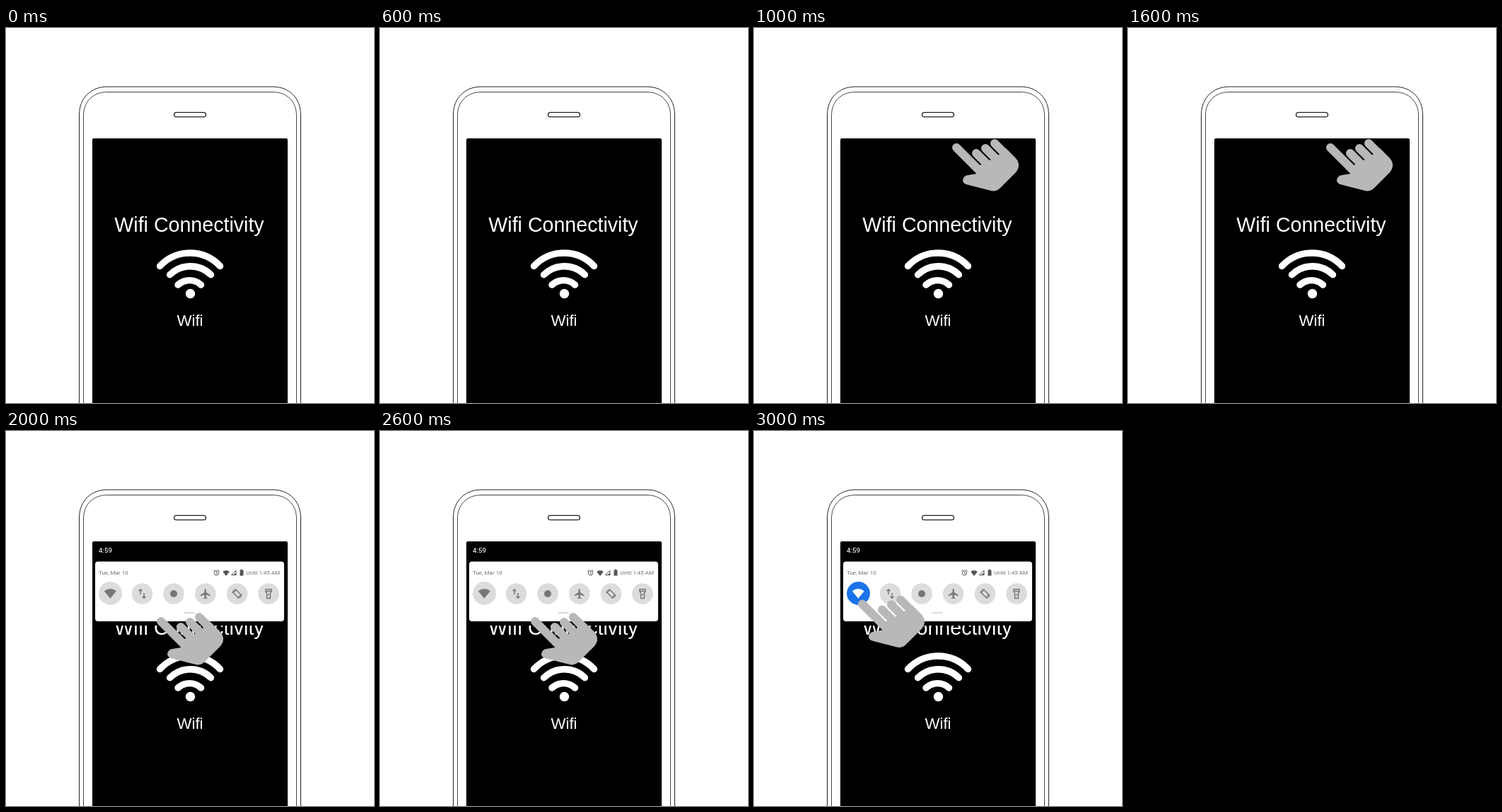
These frames come from a looping animation (520 px wide and 530 px high, 4000 ms). An HTML page:

```html
<!DOCTYPE html>
<html lang="en">
<head>
<meta charset="utf-8">
<title>Wifi Connectivity</title>
<style>
  html, body { margin: 0; width: 100%; height: 100%; overflow: hidden; background: #fff; }
  svg { display: block; width: 520px; height: 530px; }
  .title { font-family: "Liberation Sans", Arial, sans-serif; fill: #fff; text-anchor: middle; font-variant-ligatures: none; }
  .small { font: 8px Roboto, sans-serif; fill: #707070; }
  .clock { font: 500 9.6px Roboto, sans-serif; fill: #e4e4e4; }
  .line { fill: none; stroke: #777; stroke-width: 1.5; }
</style>
</head>
<body>
<svg viewBox="0 0 520 530">
  <defs>
    <path id="fan" d="M-8.5 -3.8Q0 -10 8.5 -3.8L0 6.8Z"/>
    <g id="handShape" fill="#b8b8b8">
      <path d="M286 169L322 205M314 177L332 195M327 170L345 188M340 163L361 184" stroke="#b8b8b8" stroke-width="12" stroke-linecap="round"/>
      <path d="M314 206L319 194L333 187L346 179L356 170L370 184Q378 194 370 204L349 225Q343 232 335 230L300 221Q295 219 295 215Q296 209 302 208Z"/>
    </g>
  </defs>

  <g fill="none" stroke="#222">
    <path d="M103.5 531V123C103.5 99 120 83 143 83H377C400 83 416.5 99 416.5 123V531"/>
    <path d="M109.5 531V124C109.5 104 123 90.5 143 90.5H377C397 90.5 410.5 104 410.5 124V531" stroke="#444"/>
    <rect x="237.5" y="119.3" width="45" height="6.4" rx="3.2" stroke-width="1.3"/>
  </g>
  <rect x="122" y="156" width="276" height="380" rx="2"/>

  <text class="title" x="259" y="288" font-size="28.6">Wifi Connectivity</text>
  <text class="title" x="260" y="421" font-size="22.3">Wifi</text>
  <g fill="none" stroke="#fff" stroke-width="9.4" stroke-linecap="round">
    <path d="M217.5 336.5A58 58 0 0 1 302.5 336.5"/>
    <path d="M231.5 348.7A41 41 0 0 1 289.5 348.7"/>
    <path d="M243 363A24 24 0 0 1 275.5 363"/>
  </g>
  <circle cx="260.5" cy="375.5" r="6.7" fill="#fff"/>

  <g id="panel">
    <rect x="123" y="157" width="274" height="118"/>
    <text class="clock" x="131" y="172">4:59</text>
    <rect x="126" y="184.5" width="267" height="84.5" rx="4" fill="#fff"/>
    <text class="small" x="131" y="203">Tue, Mar 10</text>
    <text class="small" x="387" y="203" text-anchor="end">Until 1:45 AM</text>

    <g fill="#555">
      <g fill="none" stroke="#555">
        <circle cx="297.5" cy="200.7" r="3.2"/>
        <path d="M297.5 198.7V201L299 202M293.3 198.2L295.5 196.2M301.7 198.2L299.5 196.2"/>
        <path d="M318.5 203.5H325V197Z"/>
      </g>
      <use href="#fan" transform="translate(311 201) scale(.57)"/>
      <path d="M321.5 203.5L325 200V203.5Z"/>
      <path d="M330.5 196.5H332V195.5H334V196.5H335.5V204.5H330.5Z"/>
    </g>

    <g id="discs" fill="#dcdcdc">
      <circle id="wifiDisc" cx="147.5" cy="229.5" r="16.4"/>
    </g>
    <use id="wifiFan" href="#fan" transform="translate(147.3 230)"/>
    <path class="line" d="M190 231V224M187.6 226.3L190 223.8L192.4 226.3M195 229V236M192.6 233.7L195 236.2L197.4 233.7" stroke-width="1.3"/>
    <circle cx="237" cy="230" r="5" fill="#777"/>
    <path transform="translate(281.7 230)" fill="#777" d="M-1.2 -5.8Q0 -8 1.2 -5.8V-2L7 1.7V3.2L1.2 1.4V5L2.8 6.2V7.3L0 6.5L-2.8 7.3V6.2L-1.2 5V1.4L-7 3.2V1.7L-1.2 -2Z"/>
    <g class="line" transform="translate(326.5 230)">
      <rect x="-2.8" y="-5" width="5.6" height="10" transform="rotate(-45)"/>
      <path d="M-6.5 -1A6.5 6.5 0 0 1 -1 -6.5M6.5 1A6.5 6.5 0 0 1 1 6.5" stroke-width="1.2"/>
    </g>
    <g class="line" transform="translate(371 230)">
      <path d="M-4 -6.2H4V-3.2L2.4 -.8V6.4H-2.4V-.8L-4 -3.2ZM-4 -3.4H4"/>
      <path d="M0 .3V2.6"/>
    </g>
    <rect x="251.5" y="255.7" width="15.5" height="2.6" rx="1" fill="#dedede"/>
  </g>

  <use id="hand" href="#handShape"/>
</svg>
<script>
  const el = id => document.getElementById(id);
  const show = (id, on) => el(id).setAttribute("visibility", on ? "visible" : "hidden");
  const handAt = [[0, 0], [0, 0], [-67, 100], [-133, 75.5]];

  for (const x of [192.5, 237, 281.7, 326.5, 371]) {
    const disc = el("wifiDisc").cloneNode();
    disc.removeAttribute("id");
    disc.setAttribute("cx", x);
    disc.setAttribute("cy", 230);
    disc.setAttribute("r", 14.8);
    el("discs").append(disc);
  }

  function draw() {
    const step = Math.floor(performance.now() / 1000) % 4;
    const active = step === 3;
    show("hand", step > 0);
    show("panel", step > 1);
    el("hand").setAttribute("transform", `translate(${handAt[step]})`);
    el("wifiDisc").setAttribute("fill", active ? "#1a73e8" : "#dcdcdc");
    el("wifiFan").setAttribute("fill", active ? "#fff" : "#777");
    requestAnimationFrame(draw);
  }
  draw();
</script>
</body>
</html>
```
